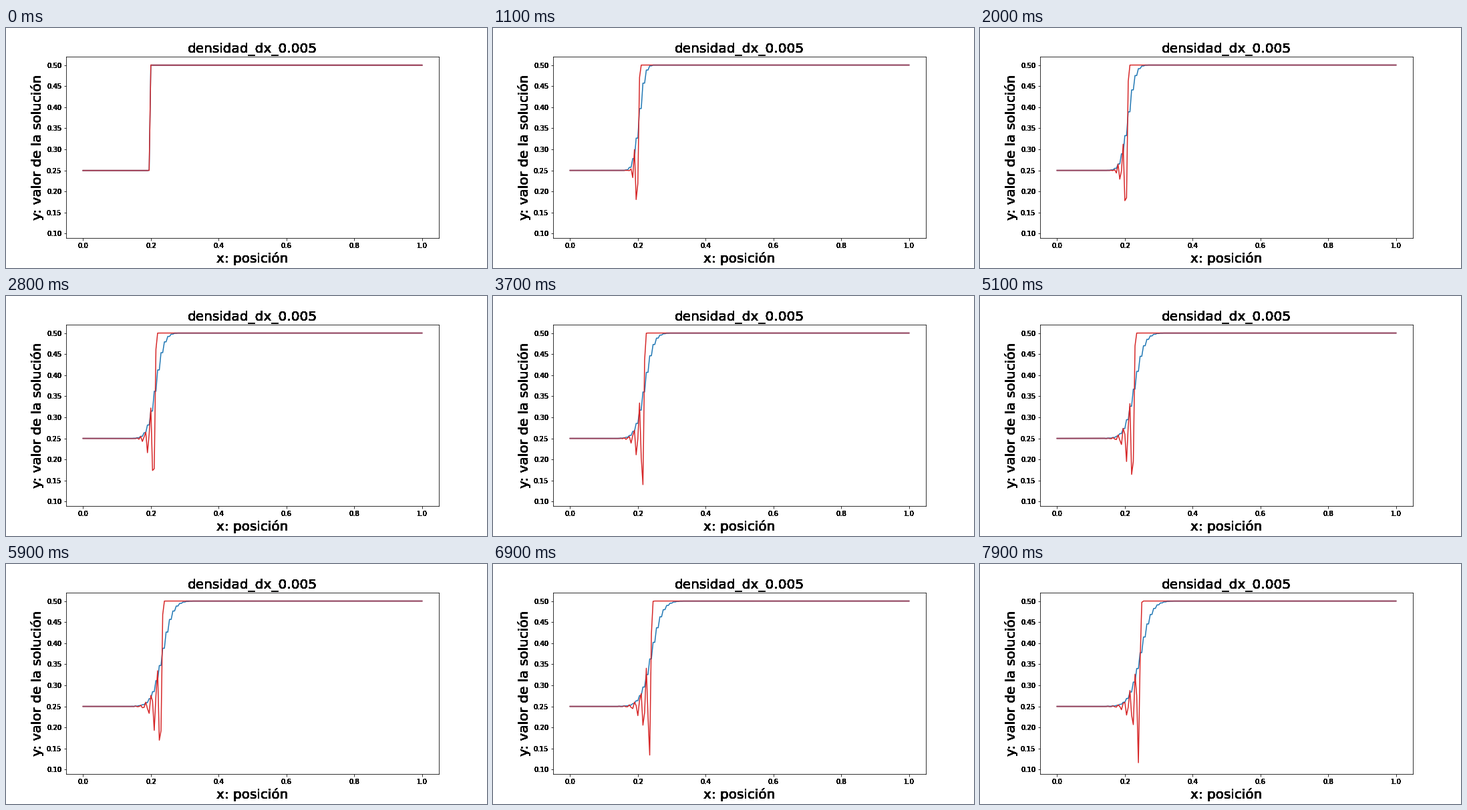
These frames come from a looping animation (720x360 px, 8 s). A matplotlib script:

```python
import numpy as np
import matplotlib.pyplot as plt
from matplotlib.animation import FuncAnimation

DX = 0.005
RATIO = 0.5  # dt / dx
STEPS = 80
MARGIN = 0.05


def flux(u):
    return u * (1 - u)


def lax_friedrichs(u):
    new = u.copy()
    new[1:-1] = (u[:-2] + u[2:]) / 2 - RATIO / 2 * (flux(u[2:]) - flux(u[:-2]))
    return new


def richtmyer(u):
    half = (u[:-1] + u[1:]) / 2 - RATIO / 2 * np.diff(flux(u))
    new = u.copy()
    new[1:-1] -= RATIO * np.diff(flux(half))
    return new


def evolve(step, u):
    states = [u]
    for _ in range(STEPS - 1):
        states.append(step(states[-1]))
    return np.array(states)


def darken(artist, times=16):
    """Overdraw text so that its soft edges turn solid."""
    draw = artist.draw

    def repeat(renderer):
        for _ in range(times):
            draw(renderer)

    artist.draw = repeat


cells = np.arange(201)
x = cells * DX
start = np.where(cells < 40, 0.25, 0.5)
smooth = evolve(lax_friedrichs, start)
sharp = evolve(richtmyer, start)

# Flat stretches where both solutions coincide
flat = np.abs(np.gradient(sharp, axis=1)) < 0.001
shared = np.where(flat & (np.abs(sharp - smooth) < 0.001), sharp, np.nan)

plt.rcParams["font.family"] = "DejaVu Sans"
fig, ax = plt.subplots(figsize=(10, 5), dpi=72, facecolor="white")
fig.subplots_adjust(left=0.125, right=0.9, bottom=0.125, top=0.88)

low, high = sharp.min(), 0.5
pad = MARGIN * (high - low)
ax.set_xlim(-MARGIN, 1 + MARGIN)
ax.set_ylim(low - pad, high + pad)
ax.set_xticks(np.linspace(0, 1, 6))
ax.set_yticks(np.linspace(0.1, 0.5, 9))
ax.set_title("densidad_dx_0.005", fontsize=20)
ax.set_xlabel("x: posición", fontsize=20)
ax.set_ylabel("y: valor de la solución", fontsize=20)

curves = [
    (ax.plot(x, data[0], color=color, lw=1.5)[0], data)
    for data, color in ((smooth, "#1f77b4"), (sharp, "#d62728"), (shared, "#964560"))
]

fig.canvas.draw()
texts = [ax.title, ax.xaxis.label, ax.yaxis.label]
for text in texts + ax.get_xticklabels() + ax.get_yticklabels():
    darken(text)


def update(n):
    for line, data in curves:
        line.set_ydata(data[n])
    return [line for line, _ in curves]


anim = FuncAnimation(fig, update, frames=STEPS, interval=100, repeat=True, repeat_delay=0)
plt.show()
```
